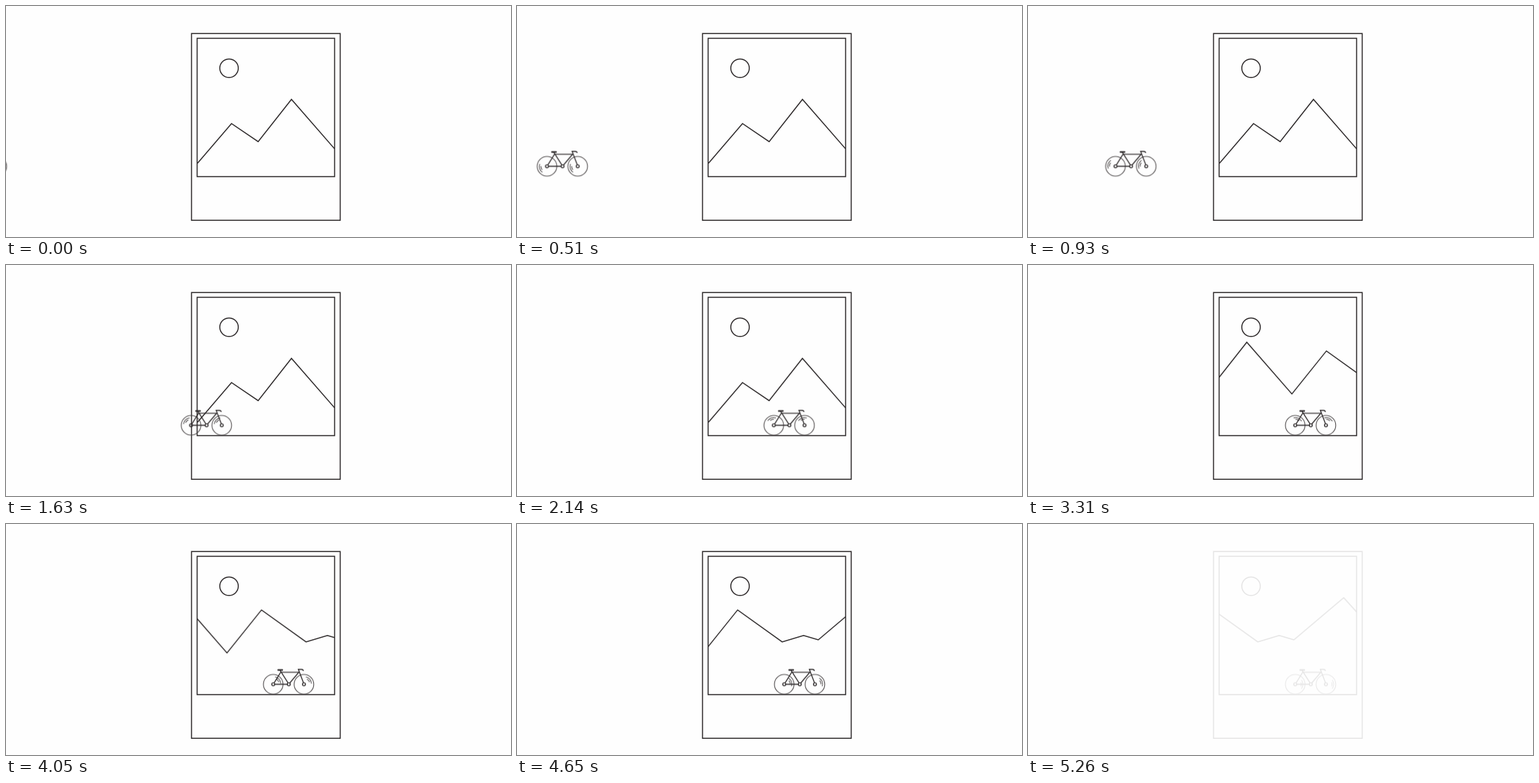
Animation of 720x329 px, one loop 5280 ms. Source, as an HTML page:

```html
<!DOCTYPE html>
<html lang="en">
<head>
<meta charset="utf-8">
<title>Bicycle ride</title>
<style>
  html, body { margin: 0; width: 100%; height: 100%; overflow: hidden; background: #fefefe; }
  svg { display: block; width: 100vw; height: 100vh; }
  .scene { fill: none; stroke: #2e2a2b; stroke-width: 1.5; }
  .scene, .bike, .scroll, .rise, .spin { animation: 5280ms linear infinite; }
  .scene { animation-name: fade; }
  .bike { animation-name: ride; }
  .scroll { animation-name: scroll; }
  .rise { animation-name: rise; }
  .spin { animation-name: spin; }
  .tyre { stroke: #4a4647; stroke-width: 1.05; }
  .seat { stroke-width: 2.2; stroke-linecap: round; }
  .bike { stroke-width: 1.35; }

  @keyframes ride {
    0% { transform: translate(-57px, 228.3px); }
    17.614% { transform: translate(124.5px, 228.3px); }
    30.871% { transform: translate(263.6px, 228.3px); }
    41.951%, 100% { transform: translate(381px, 228.3px); }
  }
  @keyframes scroll {
    0%, 40.53% { transform: translateX(0); }
    49.811% { transform: translateX(-41.2px); }
    62.689% { transform: translateX(-95px); }
    100% { transform: translateX(-258px); }
  }
  @keyframes rise {
    0%, 40.53% { transform: translateY(0); }
    49.242%, 100% { transform: translateY(-23px); }
  }
  @keyframes spin {
    from { transform: rotate(122deg); }
    to { transform: rotate(2282deg); }
  }
  @keyframes fade {
    0%, 91.856% { opacity: 1; }
    100% { opacity: .08; }
  }
</style>
</head>
<body>
<svg viewBox="0 0 720 329">
  <defs>
    <clipPath id="window"><rect x="272.5" y="46" width="196" height="197"/></clipPath>
    <g id="wheel">
      <circle class="tyre" r="14"/>
      <g class="spin">
        <path class="tyre" d="M8.85 -6.19A10.8 10.8 0 0 1 8.85 6.19M8.08 -2.94A8.6 8.6 0 0 1 8.08 2.94"/>
      </g>
      <circle r="2.1"/>
    </g>
  </defs>
  <g class="scene">
    <rect x="264.5" y="39.2" width="212" height="266"/>
    <rect x="272.5" y="46" width="196" height="197"/>
    <circle cx="318" cy="88.6" r="13.2"/>
    <g clip-path="url(#window)">
      <g class="rise"><g class="scroll">
        <path d="M273 224L321.5 167.5L359.5 193.2L407 133L471.3 206.7L520.5 145.4L584 190.9L614.5 181.8L635.5 188L706.5 128L760 187"/>
      </g></g>
    </g>
    <g class="bike">
      <use href="#wheel"/>
      <use href="#wheel" x="43.8"/>
      <circle cx="22.2" r="2.1"/>
      <!-- frame tubes -->
      <path d="M2.1 0H20.1M1.2 -1.8L10.6 -17.2H37M21.2 -1.8L9.4 -20.3M23.5 -1.7L36.6 -17.2"/>
      <!-- fork and handlebar -->
      <path d="M43.2 -2L35.8 -21.3H40.2Q42.8 -21.3 43 -19"/>
      <path class="seat" d="M7 -20.3H13"/>
    </g>
  </g>
</svg>
</body>
</html>
```
